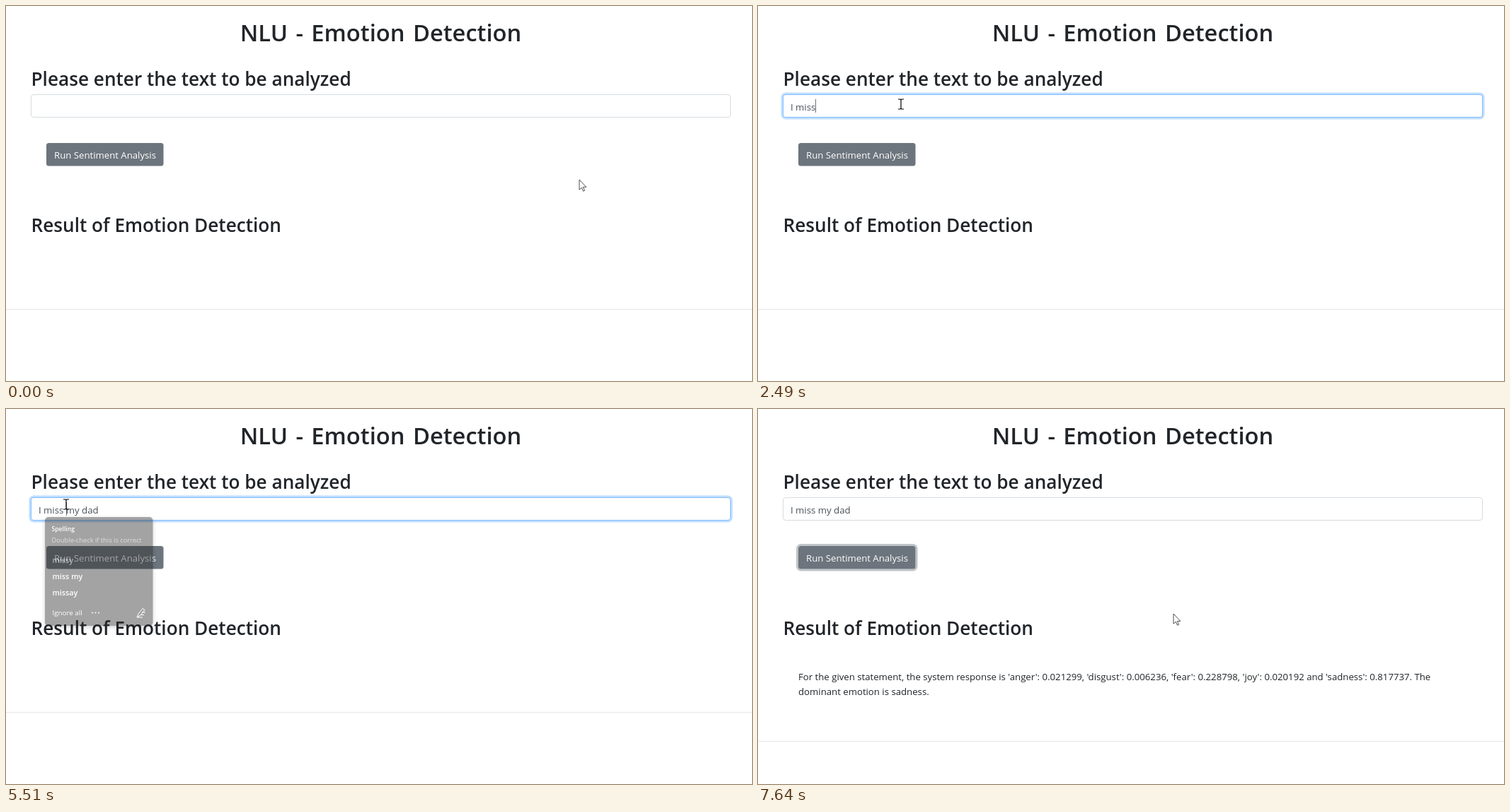
Write an HTML page that moves like this. It is 1054 px wide and 531 px high and loops after 8000 ms.

```html
<!DOCTYPE html>
<html lang="en">
<head>
<meta charset="utf-8">
<title>NLU - Emotion Detection</title>
<style>
html, body { margin: 0; height: 100%; overflow: hidden; background: #fff; }
svg { display: block; width: 1054px; height: 531px; }
text { font: 13.2px "Open Sans", "Noto Sans", sans-serif; fill: #212529; white-space: pre; }
.h1 { font-size: 32.7px; font-weight: 600; word-spacing: .09em; text-anchor: middle; }
.h2 { font-size: 26.2px; font-weight: 600; }
#typed { fill: #495057; }
#popup text { fill: #fff; font-size: 9.8px; }
#popup .word { font-size: 10.8px; font-weight: 600; }
#popup .label { font-size: 8.6px; font-weight: 600; }
#popup .hint { font-size: 9.3px; fill: #b4b4b4; }
</style>
</head>
<body>
<svg viewBox="0 0 1054 531">
  <text class="h1" x="529.5" y="50">NLU - Emotion Detection</text>
  <text class="h2" x="35.5" y="112.5">Please enter the text to be analyzed</text>
  <text class="h2" x="35.5" y="319.5">Result of Emotion Detection</text>

  <rect id="inputRing" x="34" y="124" width="991" height="35" rx="5" fill="none" stroke="#007bff" stroke-opacity=".25" stroke-width="3"/>
  <rect id="input" x="35.5" y="125.5" width="988" height="32" rx="3.5" fill="#fff"/>
  <text id="typed" x="46" y="147.5"></text>
  <path id="squiggle" fill="none" stroke="#e01010"/>
  <path id="caret" d="M0 132V151" stroke="#6c7278"/>

  <rect id="buttonRing" x="55.5" y="192.5" width="168.5" height="35.5" rx="5" fill="none" stroke="#828a91" stroke-opacity=".5" stroke-width="3"/>
  <rect id="button" x="57" y="194" width="165.5" height="32.5" rx="3.5"/>
  <text x="68" y="216" style="fill:#fff">Run Sentiment Analysis</text>

  <g id="result">
    <text x="57" y="384">For the given statement, the system response is 'anger': 0.021299, 'disgust': 0.006236, 'fear': 0.228798, 'joy': 0.020192 and 'sadness': 0.817737. The</text>
    <text x="57" y="405">dominant emotion is sadness.</text>
  </g>
  <path id="rule" d="M0 429.5H1054" stroke="#e5e5e5"/>

  <g id="popup">
    <rect x="55" y="153" width="152.5" height="154" rx="5" fill="#2b2b2b" style="filter:drop-shadow(0 2px 3px #0006)"/>
    <text class="label" x="64.5" y="172.5">Spelling</text>
    <text class="hint" x="64.5" y="188.5">Double-check if this is correct</text>
    <text class="word" x="65.5" y="218">missy</text>
    <text class="word" x="65.5" y="241">miss my</text>
    <text class="word" x="65.5" y="264">missay</text>
    <text x="65.5" y="291.5">Ignore all</text>
    <path d="M122 288.5h0M126.5 288.5h0M131 288.5h0" stroke="#fff" stroke-width="2" stroke-linecap="round"/>
    <path d="M185 295L187 290L193 282.5L196 284.5L190 292ZM185 295H193M190 291.5H195M192 288H197" fill="none" stroke="#fff"/>
  </g>

  <g id="pointer">
    <circle id="click" cx="-1.2" cy="-.8" r="10.3" fill="#fff200" fill-opacity=".56"/>
    <path id="arrow" d="M0 0V14.2L3.3 11.2L5.5 16.2L7.6 15.3L5.4 10.4H9.8Z" fill="#fff" stroke="#222" stroke-width=".8"/>
    <path id="beam" d="M-4 -7H-1L0 -6L1 -7H4M0 -6V6M-4 7H-1L0 6L1 7H4" fill="none" stroke="#000" stroke-width="1.2"/>
    <path id="hand" d="M-1.3 1.2Q0 -.6 1.3 1.2V6L6 7.2Q7.2 7.6 7 9.2L6 13V15.5H-1V13.5L-5 9.2Q-5 7.4 -3.2 8.2L-1.3 9.8Z" fill="#fff" stroke="#222" stroke-width=".6"/>
  </g>
</svg>
<script>
const LOOP = 8000, BLINK = 530;
const el = id => document.getElementById(id);
const set = (id, name, value) => el(id).setAttribute(name, value);
const show = (id, opacity) => set(id, 'opacity', +opacity);
const within = (t, [from, to]) => t >= from && t < to;

const ease = p => { p = Math.max(0, Math.min(1, p)); return p * p * (3 - 2 * p); };
const ramp = (t, start, length = 150) => ease((t - start) / length);
const pulse = (t, on, off, length) => ramp(t, on, length) - ramp(t, off, length);
const mix = (a, b, p) => a + (b - a) * p;
const mixColor = (a, b, p) => `rgb(${a.map((v, i) => mix(v, b[i], p))})`;

// pointer stops: time, x, y
const stops = [
  [290, 810, 246], [780, 181, 145], [850, 181, 145], [1010, 202, 139],
  [4070, 202, 139], [4350, 212, 176], [4760, 85, 136], [4900, 85, 136],
  [5250, 85, 236], [5350, 85, 236], [5490, 85, 135], [5530, 85, 135],
  [5660, 91, 158], [5860, 97, 191], [6030, 97, 191], [6200, 96, 202],
  [6620, 96, 202], [7040, 583, 299], [7440, 583, 299], [7640, 587, 290]
];
const clicks = [[720, 960], [4740, 4890], [5300, 5420], [6330, 6630]];

const phrase = 'I missmy dad', corrected = 'I miss my dad';
const keys = [1620, 1770, 1970, 2190, 2390, 2490, 2740, 2990, 3150, 3370, 3570, 3620];
const focusAt = 785, placeCaretAt = 4800, correctAt = 5500, blurAt = 6250, answerAt = 7440;
const caretResets = [focusAt, ...keys, placeCaretAt, correctAt];

let wave = 'M54 150.5';
for (let x = 56; x <= 100; x += 2) wave += `L${x} ${x % 4 ? 150.5 : 148.5}`;
set('squiggle', 'd', wave);

function pointerAt(t) {
  const next = stops.findIndex(s => s[0] > t);
  if (next === 0) return stops[0].slice(1);
  if (next < 0) return stops.at(-1).slice(1);
  const [t0, x0, y0] = stops[next - 1], [t1, x1, y1] = stops[next];
  const p = ease((t - t0) / (t1 - t0));
  return [mix(x0, x1, p), mix(y0, y1, p)];
}

function drawPointer(t) {
  const [x, y] = pointerAt(t);
  const overInput = x > 35 && x < 1024 && y > 125 && y < 158;
  const overButton = t > 6000 && x > 57 && x < 222 && y > 194 && y < 227;
  set('pointer', 'transform', `translate(${x} ${y})`);
  show('beam', overInput);
  show('hand', overButton);
  show('arrow', !overInput && !overButton);
  show('click', clicks.some(c => within(t, c)));
}

function drawInput(t) {
  const focus = pulse(t, focusAt, blurAt);
  show('inputRing', focus);
  set('input', 'stroke', mixColor([214, 219, 224], [128, 189, 255], focus));

  const typed = el('typed');
  typed.textContent = t < correctAt ? phrase.slice(0, keys.filter(k => k <= t).length) : corrected;
  show('squiggle', within(t, [3200, correctAt]));

  const reset = caretResets.filter(r => r <= t).at(-1);
  show('caret', within(t, [focusAt, blurAt]) && Math.floor((t - reset) / BLINK) % 2 === 0);
  const caretX = t < placeCaretAt ? 46.5 + typed.getComputedTextLength() : 85;
  set('caret', 'transform', `translate(${Math.floor(caretX) + .5} 0)`);
}

function draw(t) {
  drawPointer(t);
  drawInput(t);
  show('popup', pulse(t, 4880, 5440, 130));
  set('button', 'fill', mixColor([108, 117, 125], [90, 98, 104], pulse(t, 6080, 6650)));
  show('buttonRing', ramp(t, 6620));
  show('result', t >= answerAt);
  set('rule', 'transform', `translate(0 ${t < answerAt ? 0 : 41})`);
}

const start = performance.now();
(function tick() {
  draw((performance.now() - start) % LOOP);
  requestAnimationFrame(tick);
})();
</script>
</body>
</html>
```
